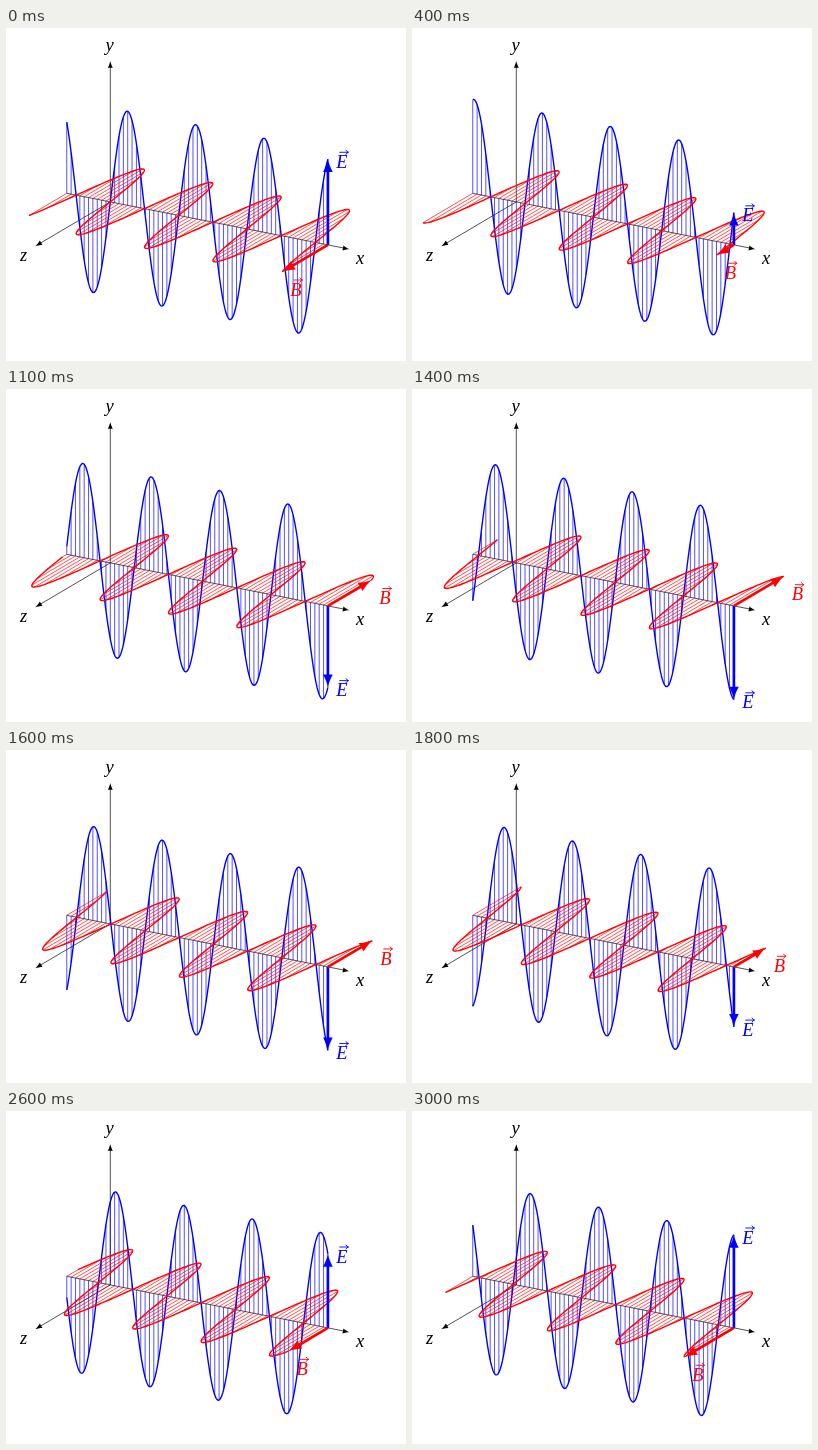
These frames come from a looping animation (400x333 px, 3.1 s). An HTML page:

```html
<!DOCTYPE html>
<html lang="en">
<head>
<meta charset="utf-8">
<title>Electromagnetic wave</title>
<style>
  html, body { margin: 0; width: 100%; height: 100%; overflow: hidden; background: #fff; }
  svg { display: block; width: 100%; height: 100%; }
  text { font: italic 18.5px "Liberation Serif", "Times New Roman", serif; }
  path { fill: none; stroke-width: .68; }
  .axis { stroke: #000; }
  .e { stroke: #00f; }
  .b { stroke: #f00; }
  .curve { stroke-width: 1.4; stroke-linejoin: round; }
  .shaft { stroke-width: 2.7; }
  .head { stroke: none; fill: #000; }
  .e.head, .e text { fill: #00f; }
  .b.head, .b text { fill: #f00; }
  g text { stroke: none; }
  g path { stroke-width: .9; stroke-linecap: round; }
</style>
</head>
<body>
<svg id="stage" viewBox="0 0 400 333">
  <text x="99.5" y="23">y</text>
  <text x="350" y="236">x</text>
  <text x="14" y="233">z</text>
</svg>
<script>
const stage = document.getElementById('stage');
const UX = [21.76, 4.3], UY = [0, -47], UZ = [-25, 14.75];
const ORIGIN = [104.3, 173.9];
const AMP = 2, K = 2, X0 = -2, X1 = 10;
const FRAME = 100, FRAMES = 31, PHASE_STEP = 0.2;

// Oblique projection of a 3D point
const project = (x, y, z) =>
  ORIGIN.map((o, i) => o + x * UX[i] + y * UY[i] + z * UZ[i]);
const fmt = p => p.map(v => v.toFixed(2)).join(' ');

function add(tag, cls, parent = stage) {
  const el = document.createElementNS('http://www.w3.org/2000/svg', tag);
  el.setAttribute('class', cls);
  return parent.appendChild(el);
}

function makeArrow(cls, shaftCls, u) {
  const shaft = add('path', cls + ' ' + shaftCls);
  const head = add('path', cls + ' head');
  head.setAttribute('d', `M0 0C${-2.67 * u} ${.5 * u} ${-7 * u} ${2 * u} ${-10 * u} ${3.75 * u}` +
    `V${-3.75 * u}C${-7 * u} ${-2 * u} ${-2.67 * u} ${-.5 * u} 0 0Z`);
  return (from, to) => {
    const dx = to[0] - from[0], dy = to[1] - from[1];
    const len = Math.hypot(dx, dy), angle = Math.atan2(dy, dx);
    const cut = 9 * u;
    const end = len > cut ? [to[0] - dx / len * cut, to[1] - dy / len * cut] : from;
    shaft.setAttribute('d', `M${fmt(from)}L${fmt(end)}`);
    head.setAttribute('transform', `translate(${fmt(to)}) rotate(${angle * 180 / Math.PI})`);
  };
}

function makeLabel(cls, letter) {
  const g = add('g', cls);
  add('text', '', g).textContent = letter;
  add('path', '', g).setAttribute('d', 'M3.5 -15.6H12M9.8 -17.6Q10.6 -16 12.2 -15.6Q10.6 -15.2 9.8 -13.6');
  return (x, y) => g.setAttribute('transform', `translate(${x.toFixed(2)} ${y.toFixed(2)})`);
}

function makeWave(cls, point) {
  const comb = add('path', cls), curve = add('path', cls + ' curve');
  return phase => {
    const at = x => point(x, AMP * Math.sin(K * x - phase));
    let teeth = '', line = '';
    for (let i = 0; i <= 60; i++) {
      const x = X0 + i * .2;
      teeth += `M${fmt(project(x, 0, 0))}L${fmt(at(x))}`;
    }
    for (let i = 0; i <= 360; i++) {
      line += (i ? 'L' : 'M') + fmt(at(X0 + (X1 - X0) * i / 360));
    }
    comb.setAttribute('d', teeth);
    curve.setAttribute('d', line);
  };
}

const axis = (from, to) => makeArrow('axis', '', .68)(project(...from), project(...to));
axis([X0, 0, 0], [11, 0, 0]);
axis([0, 0, 0], [0, 3, 0]);
axis([0, 0, 0], [0, 0, 3]);

const ePoint = (x, v) => project(x, v, 0);
const bPoint = (x, v) => project(x, 0, v);
const waves = [makeWave('e', ePoint), makeWave('b', bPoint)];
const eArrow = makeArrow('e', 'shaft', 1.29), bArrow = makeArrow('b', 'shaft', 1.29);
const eLabel = makeLabel('e', 'E'), bLabel = makeLabel('b', 'B');

function draw(step) {
  const phase = step * PHASE_STEP;
  waves.forEach(wave => wave(phase));
  const value = AMP * Math.sin(K * X1 - phase);
  const base = project(X1, 0, 0), e = ePoint(X1, value), b = bPoint(X1, value);
  eArrow(base, e);
  bArrow(base, b);
  eLabel(e[0] + 8.3, e[1] + 8.8);
  bLabel(b[0] + 8, b[1] + 23.8);
}

let shown = -1;
function tick() {
  const step = Math.floor(performance.now() / FRAME) % FRAMES;
  if (step !== shown) draw(shown = step);
  requestAnimationFrame(tick);
}
tick();
</script>
</body>
</html>
```
